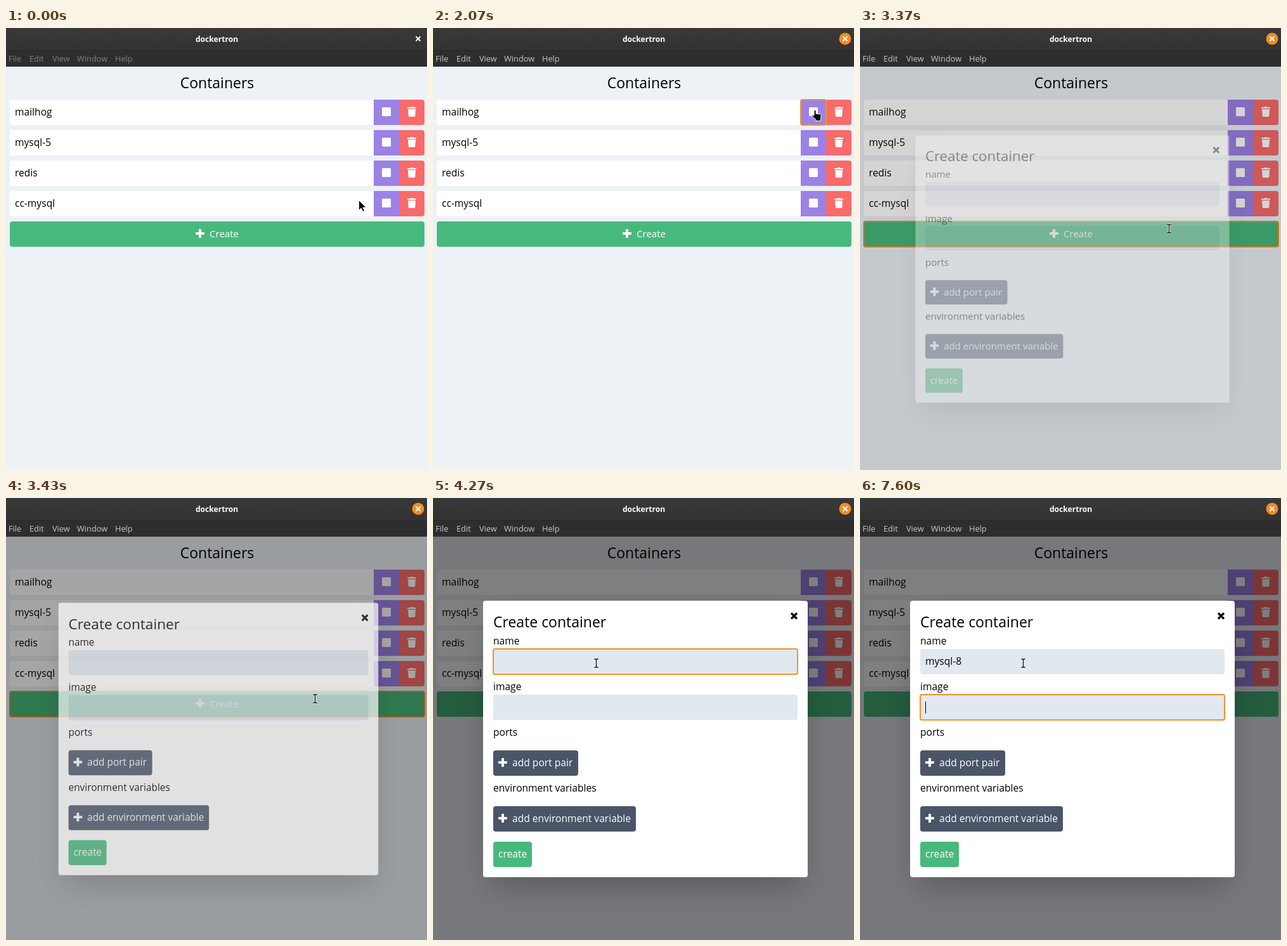
Write an HTML page that moves like this. It is 664 px wide and 697 px high and loops after 8000 ms.

```html
<!DOCTYPE html>
<html lang="en">
<head>
<meta charset="utf-8">
<title>dockertron</title>
<style>
  html, body { margin: 0; width: 100%; height: 100%; overflow: hidden; background: #edf2f7; }
  svg { display: block; width: 664px; height: 697px; cursor: default; user-select: none; }
  text { font-family: "Open Sans", "Noto Sans", sans-serif; font-size: 15.6px; white-space: pre; }
  .focus { fill: none; stroke: #f0922b; stroke-width: 2; }
</style>
</head>
<body>
<svg id="stage" viewBox="0 0 664 697"></svg>
<script>
const LOOP = 8000;
const ROW_TOP = 113, ROW_STEP = 48, ROW_HEIGHT = 40;
const names = ['mailhog', 'mysql-5', 'redis', 'cc-mysql'];

// Markup helpers
const rect = (x, y, w, h, fill, r = 0, extra = '') =>
  `<rect x="${x}" y="${y}" width="${w}" height="${h}" rx="${r}" fill="${fill}" ${extra}/>`;
const text = (x, y, label, fill = '#000', extra = '') =>
  `<text x="${x}" y="${y}" fill="${fill}" ${extra}>${label}</text>`;
const size = px => `style="font-size:${px}px"`;
const plus = (x, y) => rect(x - 7, y - 2, 14, 4, '#fff', 1) + rect(x - 2, y - 7, 4, 14, '#fff', 1);
const cross = (x, y, r, width, color) =>
  `<path d="M${x - r} ${y - r}l${2 * r} ${2 * r}m0 ${-2 * r}l${-2 * r} ${2 * r}" stroke="${color}" stroke-width="${width}"/>`;
const focusRing = (id, x, y, w, h) =>
  `<rect id="${id}" class="focus" x="${x}" y="${y}" width="${w}" height="${h}" rx="3"/>`;
const trash = y => `<path fill="#fff" transform="translate(633 ${y - 8})"
  d="M.5 1H4l.6-.8Q4.800 0 5 0h4q.2 0 .4.2L10 1h3.500q.5 0 .5.500V3H0V1.500Q0 1 .5 1zM1 4h12l-.7 10.600q-.1 1.400-1.500 1.400H3.200q-1.400 0-1.500-1.400z"/>`;

function row(name, i) {
  const y = ROW_TOP + i * ROW_STEP, mid = y + 19;
  return rect(610, y, 50, 40, '#f96a6a', 4)
    + rect(6, y, 584, 40, '#fff', 4, `id="row${i}"`)
    + rect(580, y, 40, 40, '#9d82e6')
    + text(14, y + 25, name)
    + rect(593, mid - 7, 14, 14, '#fff', 1.5, `id="stop${i}"`)
    + trash(mid);
}

const menu = [[4, 'File'], [37, 'Edit'], [73, 'View'], [112, 'Window'], [172, 'Help']];
const squiggle = 'M103.500 266.500' + 'l2-1l2 1'.repeat(10) + 'l2-1';

document.getElementById('stage').innerHTML = `
  <defs>
    <linearGradient id="bar" x2="0" y2="1"><stop stop-color="#393939"/><stop offset="1" stop-color="#323232"/></linearGradient>
    <filter id="blur" x="-30%" y="-30%" width="160%" height="160%"><feGaussianBlur stdDeviation="25"/></filter>
    <clipPath id="page"><rect y="61" width="664" height="636"/></clipPath>
  </defs>
  ${rect(0, 0, 664, 697, '#edf2f7')}
  ${rect(0, 0, 664, 36, 'url(#bar)')}
  ${rect(0, 35, 664, 26, '#2e2e2e')}
  ${rect(0, 35, 664, 1, '#272727')}
  ${text(332.5, 22, 'dockertron', '#fff', 'text-anchor="middle" font-weight="700" style="font-size:12.100px"')}
  <g id="menu">${menu.map(([x, label]) => text(x, 53, label, 'inherit', size(12.8))).join('').replaceAll('fill="inherit"', '')}</g>
  <circle id="closeDisc" cx="650" cy="17" r="9.500" fill="#f28b26"/>
  ${cross(650, 17, 3.5, 2, '#fff')}

  ${text(333, 95, 'Containers', '#000', 'text-anchor="middle" style="font-size:23px"')}
  ${names.map(row).join('')}
  <path id="play" fill="#fff" d="M593 125q0-1.500 1.500-.8l12 7q1 .8 0 1.600l-12 7q-1.500.7-1.500-.8z"/>
  ${rect(6, 305, 654, 40, '#48b97d', 4)}
  ${plus(306, 324)}
  ${text(321, 330, 'Create', '#fff', size(15.1))}
  <g id="toggleFocus"><path d="M578.500 113v40" stroke="#fff"/>${focusRing('', 580, 113, 40, 40)}</g>
  ${focusRing('createFocus', 6, 305, 654, 40)}

  <g clip-path="url(#page)">
    ${rect(0, 61, 664, 636, '#000', 0, 'id="shade"')}
    <g id="modal">
      ${rect(91, 199, 488, 412, '#000', 0, 'opacity=".25" filter="url(#blur)"')}
      ${rect(79, 162, 512, 436, '#fff', 4)}
      ${text(95, 204, 'Create container', '#000', size(23))}
      ${cross(569.5, 186, 4.5, 3.2, '#000')}
      ${text(95, 231, 'name')}
      ${rect(95, 238, 480, 40, '#e2e8f0', 4)}
      ${text(95, 303, 'image')}
      ${rect(95, 310, 480, 40, '#e2e8f0', 4)}
      ${text(95, 375, 'ports')}
      ${rect(95, 398, 134, 40, '#4a5568', 4)}${plus(110, 417)}${text(125, 423, 'add port pair', '#fff')}
      ${text(95, 463, 'environment variables')}
      ${rect(95, 486, 225, 40, '#4a5568', 4)}${plus(110, 505)}${text(125, 511, 'add environment variable', '#fff')}
      ${rect(95, 542, 61, 40, '#48b97d', 4)}${text(103, 567, 'create', '#fff')}
      ${focusRing('nameFocus', 95, 238, 480, 40)}
      ${focusRing('imageFocus', 95, 310, 480, 40)}
      ${text(103, 263, '', '#000', 'id="typed"')}
      <path id="squiggle" d="${squiggle}" fill="none" stroke="#f33" stroke-width="1"/>
      ${rect(0, 0, 1, 19, '#000', 0, 'id="caret"')}
    </g>
  </g>

  <g id="cursor" stroke="#fff" stroke-linejoin="round">
    <path id="arrow" d="M0 0V16l3.700-3.400 2.700 5.400 2.600-1.200-2.600-5.300H11.500z"/>
    <path id="hand" d="M-1.500-2q1.500-2 3 0v4.500l6.500 1q2 .6 1.800 3l-.8 4V14H1.500v-2l-6-5.500q-.5-2 1.500-1.800l1.500 1z"/>
    <g id="beam" fill="none">
      <path d="M-3-6.500h2l1 1 1-1h2M0-6V6M-3 6.500h2l1-1 1 1h2" stroke-width="3"/>
      <path d="M-3-6.500h2l1 1 1-1h2M0-6V6M-3 6.500h2l1-1 1 1h2" stroke="#000" stroke-width="1.300"/>
    </g>
  </g>`;

const el = id => document.getElementById(id);
const show = (id, on) => el(id).setAttribute('visibility', on ? 'visible' : 'hidden');
const set = (id, name, value) => el(id).setAttribute(name, value);
const progress = (t, from, to) => Math.min(1, Math.max(0, (t - from) / (to - from)));
const ease = p => p * p * (3 - 2 * p);
const mix = (a, b, p) => `rgb(${a.map((v, i) => Math.round(v + (b[i] - v) * p))})`;
const within = (t, from, to) => t >= from && t < to;

// Pointer moves: start time, end time, then start, control and end points
const moves = [
  [0, 630, [556, 271], [665, 212], [602, 132]],
  [2270, 2730, [602, 132], [550, 225], [487, 316]],
  [3500, 4070, [487, 316], [375, 300], [257, 260]]
];
// Each key press: time and the field's content afterwards
const keys = [[4870, 'm'], [4970, 'my'], [5070, 'mys'], [5170, 'mysq'], [5330, 'mysql'], [7000, 'mysql-'], [7200, 'mysql-8']];

function pointerAt(t) {
  const [from, to, a, c, b] = moves.findLast(m => t >= m[0]);
  const p = ease(progress(t, from, to)), q = 1 - p;
  return [0, 1].map(i => q * q * a[i] + 2 * p * q * c[i] + p * p * b[i]);
}

function pointerShape(x, y, modalOpen) {
  if (modalOpen) return within(y, 238, 278) || within(y, 310, 350) ? 'beam' : 'arrow';
  const i = Math.floor((y - ROW_TOP) / ROW_STEP);
  const onBar = i >= 0 && i <= 4 && y - ROW_TOP - i * ROW_STEP < ROW_HEIGHT;
  return onBar && (i === 4 || x >= 580) ? 'hand' : 'arrow';
}

function draw(t) {
  // Window focus
  const active = progress(t, 870, 1030);
  set('menu', 'fill', mix([128, 128, 128], [200, 200, 200], active));
  set('closeDisc', 'opacity', active);

  // First container stops, then starts again
  const stopped = within(t, 960, 1730);
  const grey = ease(progress(t, 930, 1300)) - ease(progress(t, 1670, 2070));
  set('row0', 'fill', mix([255, 255, 255], [205, 214, 222], grey));
  show('stop0', !stopped);
  show('play', stopped);

  // Focus rings
  show('toggleFocus', within(t, 900, 3270));
  show('createFocus', within(t, 3270, 3670));
  show('nameFocus', within(t, 3670, 7600));
  show('imageFocus', t >= 7600);

  // Dialog
  const open = progress(t, 3315, 3480), scale = 0.95 + 0.05 * open;
  set('shade', 'opacity', open / 2);
  set('modal', 'opacity', open);
  set('modal', 'transform', `translate(335 380) scale(${scale}) translate(-335 -380)`);

  // Typing
  const key = keys.findLast(k => t >= k[0]);
  el('typed').textContent = key ? key[1] : '';
  show('squiggle', within(t, 6330, 7600));
  const inImage = t >= 7600;
  const typedWidth = key && !inImage ? el('typed').getComputedTextLength() : 0;
  set('caret', 'x', Math.round(103 + typedWidth));
  set('caret', 'y', inImage ? 321 : 248);
  show('caret', t >= 3670 && !within(t, 4270, 4870) && !within(t, 6100, 6530));

  // Pointer
  const [x, y] = pointerAt(t);
  const shape = pointerShape(x, y, t >= 3315);
  set('cursor', 'transform', `translate(${Math.round(x) + 0.5} ${Math.round(y) + 0.5})`);
  for (const id of ['arrow', 'hand', 'beam']) show(id, id === shape);
}

const start = performance.now();
function frame() {
  draw((performance.now() - start) % LOOP);
  requestAnimationFrame(frame);
}
draw(0);
requestAnimationFrame(frame);
</script>
</body>
</html>
```
